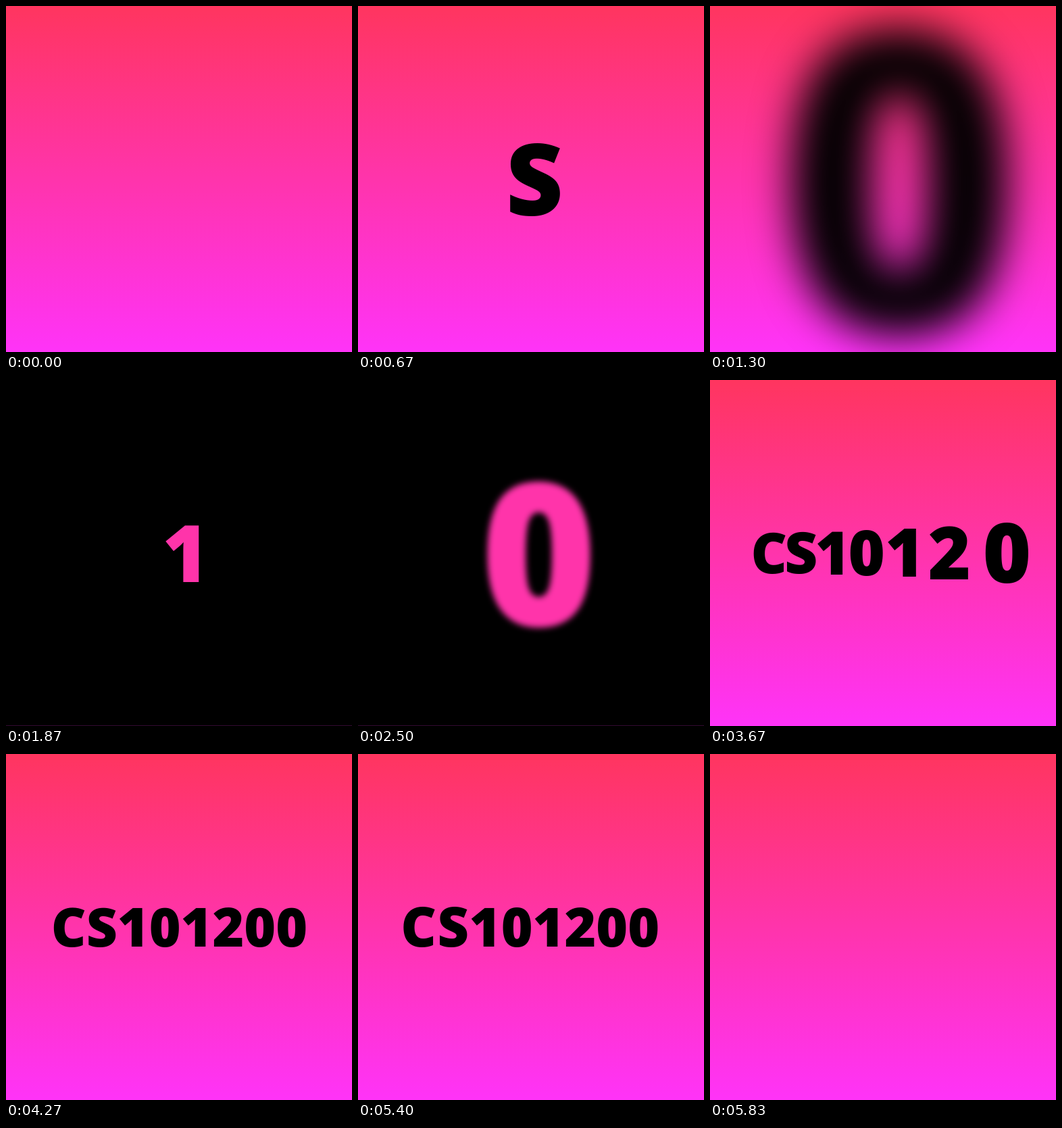
An HTML page with a canvas that plays this animation: 512 by 512 pixels, repeating every 6010 ms.

```html
<!DOCTYPE html>
<html lang="en">
<head>
<meta charset="utf-8">
<title>CS101200</title>
<style>
  html, body { margin: 0; width: 100%; height: 100%; overflow: hidden; background: #ff34ac; }
  canvas { display: block; width: 512px; height: 512px; }
</style>
</head>
<body>
<canvas id="stage" width="512" height="512"></canvas>
<script>
const ctx = document.getElementById('stage').getContext('2d');
const SIZE = 512, MID = SIZE / 2, LOOP = 6010, STEP = 100 / 3;
const TEXT = 'CS101200', FONT = '800 80px "Open Sans", sans-serif';
const PINK = '#ff34aa';

const INTRO = { start: 104, period: 384.5, rate: 0.00305, end: 3150 };
const ENTER = { start: 3150, stagger: 62, length: 700 };
const EXIT = { start: 5127, stagger: 32, length: 530, end: 5830 };

const clamp = (v) => Math.min(1, Math.max(0, v));

const sky = ctx.createLinearGradient(0, 0, 0, SIZE);
sky.addColorStop(0, '#ff355f');
sky.addColorStop(1, '#ff33f8');

// Ink centre of a string relative to its drawing origin
function inkCentre(text) {
  const m = ctx.measureText(text);
  return (m.actualBoundingBoxRight - m.actualBoundingBoxLeft) / 2;
}

// Draws a glyph magnified about the stage centre; nearness is 1 / scale
function drawGlyph(char, x, y, nearness, softness, color) {
  if (nearness < 0.05) return;
  const scale = 1 / nearness;
  const blur = Math.min(32, softness * (scale - 1) ** 2);
  ctx.save();
  if (blur > 0.15) ctx.filter = `blur(${blur.toFixed(2)}px)`;
  ctx.translate(MID, MID);
  ctx.scale(scale, scale);
  ctx.fillStyle = color;
  ctx.fillText(char, x, y);
  ctx.restore();
}

function drawIntro(t) {
  const time = t - INTRO.start;
  const i = Math.min(TEXT.length - 1, Math.floor(time / INTRO.period));
  const nearness = clamp((time - i * INTRO.period) * INTRO.rate);
  const inverted = i % 2 === 0;
  if (inverted) {
    ctx.fillStyle = '#000';
    ctx.fillRect(0, 0, SIZE, 511.8);
  }
  drawGlyph(TEXT[i], 3.2 - inkCentre(TEXT[i]), 29.2, nearness, 0.7, inverted ? PINK : '#000');
}

function rowNearness(t, i) {
  const inAt = (t - ENTER.start - i * ENTER.stagger) / ENTER.length;
  if (inAt <= 0) return 0;
  const left = 1 - clamp(inAt);
  const arriving = 0.42 * left ** 13 + 0.53 * left ** 2.1;
  const leaving = clamp((t - EXIT.start - i * EXIT.stagger) / EXIT.length) ** 6;
  return 1 - arriving - leaving;
}

function drawRow(t) {
  const left = 1.5 - inkCentre(TEXT);
  [...TEXT].forEach((char, i) => {
    const x = left + ctx.measureText(TEXT.slice(0, i)).width;
    drawGlyph(char, x, 28.6, rowNearness(t, i), 2.3, '#000');
  });
}

function render(now) {
  const time = now % LOOP;
  const t = Math.floor((time + 3.4) / STEP) * STEP;
  ctx.font = FONT;
  ctx.fillStyle = sky;
  ctx.fillRect(0, 0, SIZE, SIZE);
  if (t > 130 && t < INTRO.end) drawIntro(t);
  else if (t >= INTRO.end && t < EXIT.end) drawRow(t);
}

const origin = performance.now();
function tick() {
  render(performance.now() - origin);
  requestAnimationFrame(tick);
}
tick();
</script>
</body>
</html>
```
